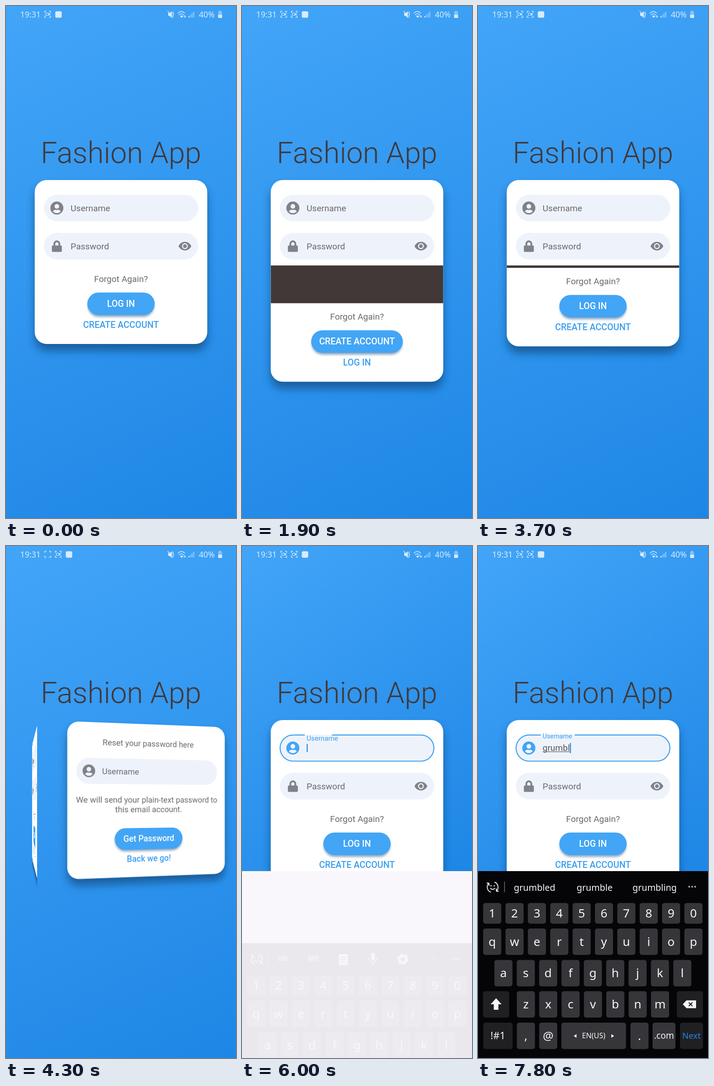
An HTML page that plays this animation: 502x1115 px, repeating every 8 s.

```html
<!DOCTYPE html>
<html lang="en">
<head>
<meta charset="utf-8">
<title>Login form</title>
<style>
  html, body { margin: 0; width: 100%; height: 100%; overflow: hidden; background: #f9f7fb; }
  #app { position: absolute; left: 0; top: 0; width: 502px; height: 1115px; overflow: hidden;
    perspective: 1000px; perspective-origin: 251px 557px; }
  .layer { position: absolute; left: 0; top: 0; width: 502px; height: 1115px; }
  .page { backface-visibility: hidden; }
  svg { display: block; width: 502px; height: 1115px; }
  text { font-family: Roboto, sans-serif; font-size: 19px; fill: #69696e; }
  .mid { text-anchor: middle; }
  .title { font-size: 64.3px; font-weight: 300; fill: #423838; }
  .strong { font-size: 19.5px; font-weight: 500; }
  .white { fill: #fff; }
  .blue { fill: #3b9ff0; }
  .sys text { font-family: "Noto Sans", sans-serif; }
</style>
</head>
<body>
<div id="app">
  <div class="layer"><svg id="back"></svg></div>
  <div class="layer page" id="login"></div>
  <div class="layer page" id="reset"></div>
</div>
<div class="layer"><svg id="system" class="sys"></svg></div>
<script>
const LOOP = 8000, STEP = 100;
const WIDTH = 502, FULL_HEIGHT = 1115, KEYBOARD_TOP = 708;
const EXPAND = 83, BLUE = '#42a5f5', GREY = '#808288';
const WORD = 'grumbl';
const TAPS = [6580, 6780, 6980, 7280, 7480, 7680];
const HINTS = [
  ['good', 'get', 'great'], ['great', 'group', 'grow'], ['grunt', 'gruel', 'grub'],
  ['grump', 'grumpy', 'grumble'], ['grumble', 'grumbled', 'grumbles'],
  ['grumbled', 'grumble', 'grumbling']
];

const $ = id => document.getElementById(id);
const attr = (id, values) => {
  for (const key in values) $(id).setAttribute(key, values[key]);
};
const show = (id, on) => attr(id, { visibility: on ? 'visible' : 'hidden' });
const clamp = x => Math.min(1, Math.max(0, x));
const part = (t, start, length) => clamp((t - start) / length);
const mix = (a, b, p) => a + (b - a) * p;

function cubic(x1, y1, x2, y2) {
  const at = (a, b, s) => 3 * a * s * (1 - s) ** 2 + 3 * b * s * s * (1 - s) + s ** 3;
  return x => {
    let low = 0, high = 1;
    for (let i = 0; i < 30; i++) {
      const s = (low + high) / 2;
      if (at(x1, x2, s) < x) low = s; else high = s;
    }
    return at(y1, y2, low);
  };
}
const ease = cubic(.25, .1, .25, 1);
const fastOutSlowIn = cubic(.4, 0, .2, 1);
const easeOutBack = x => 1 + 2.7 * (x - 1) ** 3 + 1.7 * (x - 1) ** 2;
function bounceOut(x) {
  const k = 7.5625, d = 2.75;
  if (x < 1 / d) return k * x * x;
  if (x < 2 / d) return k * (x - 1.5 / d) ** 2 + .75;
  if (x < 2.5 / d) return k * (x - 2.25 / d) ** 2 + .9375;
  return k * (x - 2.625 / d) ** 2 + .984375;
}

const text = (x, y, label, cls = '', more = '') =>
  `<text x="${x}" y="${y}" class="${cls}" ${more}>${label}</text>`;
const rect = (x, y, w, h, r, fill, more = '') =>
  `<rect x="${x}" y="${y}" width="${w}" height="${h}" rx="${r}" fill="${fill}" ${more}/>`;
const stroke = (d, color, width, more = '') =>
  `<path d="${d}" fill="none" stroke="${color}" stroke-width="${width}" ${more}/>`;

const person = (y, more = '') => `<path ${more} fill="${GREY}" fill-rule="evenodd"
  transform="translate(111 ${y}) scale(.0575)" d="M0-248a248 248 0 1 0 0 496a248 248 0 1 0 0-496z
  m0 96a88 88 0 1 1 0 176a88 88 0 1 1 0-176z M0 192c-59 0-111-27-147-68c19-35 56-60 99-60q24 8 48 8t48-8
  c43 0 80 25 99 60c-36 41-88 68-147 68z"/>`;
const lock = y => `<g transform="translate(111 ${y}) scale(.0488)">
  ${rect(-224, -32, 448, 288, 48, GREY)}${stroke('M-112-20v-84a112 112 0 0 1 224 0v84', GREY, 80)}</g>`;
const eye = y => `<g transform="translate(390.5 ${y})">
  <path d="M-14 0C-8-12.6 8-12.6 14 0C8 12.6-8 12.6-14 0z" fill="${GREY}"/>
  <circle r="5.2" fill="${GREY}" stroke="#eef3fb" stroke-width="2.4"/></g>`;
const field = y => rect(82.5, y - 29, 337, 58, 29, '#eef3fb');
const secretField = (y, label) => field(y) + lock(y) + text(141, y + 6.7, label) + eye(y);

const card = (id, bottom) =>
  rect(63, 392, 376, bottom - 377, 26, '#0b3c6b', `id="${id}Shade" opacity=".6" filter="url(#${id}Soft)"`) +
  rect(62.7, 379, 376.6, bottom - 379, 26, '#fff', `id="${id}Card"`);
const button = (id, y, w) =>
  rect(251 - w / 2 + 1, y + 5, w - 2, 48, 24, '#1a4e80', `id="${id}Under" opacity=".5" filter="url(#${id}Thin)"`) +
  rect(251 - w / 2, y, w, 49, 24.5, BLUE, `id="${id}Button"`);
const blurs = id => `<defs>
  <filter id="${id}Soft" x="-20%" y="-20%" width="140%" height="140%"><feGaussianBlur stdDeviation="9"/></filter>
  <filter id="${id}Thin" x="-20%" y="-30%" width="140%" height="170%"><feGaussianBlur stdDeviation="2.5"/></filter></defs>`;
const turning = (id, y, cls) => `<g transform="translate(251 ${y})">
  ${text(0, 6.8, 'LOG IN', 'mid strong ' + cls, `id="${id}Login"`)}
  ${text(0, 6.8, 'CREATE ACCOUNT', 'mid strong ' + cls, `id="${id}Create"`)}</g>`;

$('back').innerHTML = `<defs><linearGradient id="sky" gradientUnits="userSpaceOnUse" x1="0" y1="0" x2="${WIDTH}" y2="${FULL_HEIGHT}">
  <stop offset="0" stop-color="#42a5f8"/><stop offset="1" stop-color="#1e86e5"/></linearGradient></defs>
  ${rect(0, 0, WIDTH, FULL_HEIGHT, 0, 'url(#sky)')}
  ${text(251, 342, 'Fashion App', 'mid title')}`;

$('login').innerHTML = `<svg>${blurs('login')}
  <defs><clipPath id="slot"><rect id="slotRect" x="63" y="565" width="376"/></clipPath></defs>
  ${card('login', 736)}
  ${field(440)}${person(440, 'id="person"')}
  ${stroke('', '#3d9fee', 2.2, 'id="outline"')}
  ${text(0, 0, 'Username', '', 'id="label"')}
  ${text(141, 445.5, '', '', 'id="typed" style="fill:#58595e"')}
  ${rect(0, 0, 0, 1.2, 0, '#58595e', 'id="underline"')}
  ${rect(141, 431, 2.4, 18, 0, '#318fe6', 'id="caret"')}
  ${secretField(523, 'Password')}
  <g clip-path="url(#slot)">${rect(63, 565, 376, 84, 0, '#423838')}
    <g id="confirm">${rect(63, 565, 376, 84, 0, '#fff')}${secretField(606, 'Confirm')}</g></g>
  <g id="lower">${text(251, 600.5, 'Forgot Again?', 'mid')}
    ${button('login', 624, 147)}${turning('main', 648, 'white')}${turning('link', 694, 'blue')}</g></svg>`;

$('reset').innerHTML = `<svg>${blurs('reset')}
  ${card('reset', 728.5)}
  ${text(251, 430.5, 'Reset your password here', 'mid')}
  ${field(488)}${person(488)}${text(141, 494.7, 'Username')}
  ${text(251, 559, 'We will send your plain-text password to', 'mid')}
  ${text(251, 581, 'this email account.', 'mid')}
  ${button('reset', 617, 162)}
  ${text(251, 648, 'Get Password', 'mid strong white')}
  ${text(251, 694, 'Back we go!', 'mid strong blue')}</svg>`;

// Status bar
const PALE = '#d9ebfd';
const brackets = stroke('M-6.5-3v-3.5h3.5M3-6.5h3.5v3.5M6.5 3v3.5h-3.5M-3 6.5h-3.5v-3.5', PALE, 1.3);
const camera = stroke('M-4-2.5h5.5v5h-5.5zM2 0l2.5-1.8v3.6z', PALE, 1.2);
const statusText = (x, label) => text(x, 25, label, '', `style="font-size:17.5px;fill:${PALE}"`);
const statusBar = statusText(31, '19:31') + statusText(421, '40%') +
  `<g id="newIcon" transform="translate(91 18)">${brackets}<g id="camera">${camera}</g></g>
  <g id="icons"><g transform="translate(91 18)">${brackets}${camera}</g>${rect(107.5, 11.5, 14, 14, 3, PALE)}</g>
  <g fill="${PALE}"><path d="M354 15.5h3l5-4v14l-5-4h-3z"/>
    <rect x="463" y="12" width="8.5" height="14" rx="1.5" opacity=".45"/><rect x="465" y="10.5" width="4.5" height="2" opacity=".45"/>
    <rect x="463" y="19" width="8.5" height="7" rx="1"/>
    <path d="M380 22l3.5 4l3-4q-3-2.5-6.5 0z"/></g>
  ${stroke('M353 11l10 15M365.5 12l-1.5 3l2 3l-2 3l1.5 3.5M375 16q7.5-8 15.5 0M377.5 19.5q5-5 10.5 0M389 20v5M391.5 21v4', PALE, 1.5)}` +
  [0, 1, 2, 3].map(i => rect(398 + i * 3.6, 22 - i * 3.2, 2.1, 3 + i * 3.2, 0, PALE, `opacity="${i < 1 ? 1 : .55}"`)).join('');

// Keyboard
const KEY = '#363539', DARK_KEY = '#201f22', PITCH = 48.8;
const keyText = (x, y, label, size, fill = '#f6f6f6') =>
  text(x, y + size * .35, label, 'mid', `style="font-size:${size}px;fill:${fill}"`);
const key = (label, x, y, w, h, size = 26, fill = KEY, ink) =>
  rect(x - w / 2, y, w, h, 5, fill, /^[a-z]$/.test(label) ? `id="key-${label}"` : '') +
  keyText(x, y + h / 2, label, size, ink);
const row = (labels, x, y, h) =>
  [...labels].map((label, i) => key(label, x + i * PITCH, y, 39.5, h)).join('');
const dots = [461, 467.5, 474].map(x => `<circle cx="${x}" cy="742" r="2.1" fill="#a5a5a8"/>`).join('');
const toolbar = `<g id="tools">
  ${rect(77, 736, 22, 11, 2, '#6d6d70')}${rect(144, 734, 24, 13, 2, '#6d6d70')}
  ${rect(211, 732, 20, 24, 2, '#d8d8da')}${stroke('M215 739h12M215 744h12M215 749h8', '#202022', 2)}
  ${rect(281.5, 729, 9, 16, 4.5, '#d8d8da')}${stroke('M277 740a9 9 0 0 0 18 0M286 749v6', '#d8d8da', 2)}
  <circle cx="351" cy="743" r="7.5" fill="none" stroke="#d8d8da" stroke-width="6"/>
  <circle cx="351" cy="743" r="10.5" fill="none" stroke="#d8d8da" stroke-width="4" stroke-dasharray="5.5 5.5"/>
  ${stroke('M416 735v14M421 735v14', '#59595c', 1.5)}</g>`;
const smiley = stroke('M24 734a12 12 0 0 0 4 20M24 734v6M24 734h-5M40 752a12 12 0 0 0-4-20M40 752v-6M40 752h5M27 745q5 6 10 0', '#e4e4e6', 2) +
  '<circle cx="28.5" cy="740" r="1.5" fill="#e4e4e6"/><circle cx="35.5" cy="740" r="1.5" fill="#e4e4e6"/>';
const keyboard = `<g id="keyboard">${rect(0, KEYBOARD_TOP, WIDTH, 408, 0, '#050407')}
  ${smiley}${rect(57, 731, 1.6, 23, 0, '#68686b')}${toolbar}${dots}
  <g id="hints">${[123.5, 254.5, 385.5].map(x => keyText(x, 744, '', 19.5)).join('')}</g>
  ${row('1234567890', 31, 777.5, 45)}${row('qwertyuiop', 31, 833, 57.5)}
  ${row('asdfghjkl', 55.5, 901.5, 57.5)}${row('zxcvbnm', 104.5, 969.5, 57.5)}
  ${key('', 39.5, 969.5, 57, 57.5, 20, DARK_KEY)}${key('', 462.5, 969.5, 57, 57.5, 20, DARK_KEY)}
  <path d="M39.5 985l12 13h-7v12h-10v-12h-7z" fill="#f6f6f6"/>
  <path d="M447 998l8-8.5h21v17h-21z" fill="#f6f6f6"/>${stroke('M460 994l8 8M468 994l-8 8', DARK_KEY, 2.2)}
  ${key('!#1', 43.5, 1038, 64, 57.5, 22, DARK_KEY)}${row(',@', 104.5, 1038, 57.5)}
  ${key('EN(US)', 252.5, 1038, 141, 57.5, 16)}
  <path d="M215 1063v8l-6-4zM291 1063v8l6-4z" fill="#f6f6f6"/>
  ${row('.', 352.5, 1038, 57.5)}${key('.com', 406, 1038, 50, 57.5, 19)}
  ${key('Next', 466, 1038, 50, 57.5, 18.5, DARK_KEY, '#1e88e5')}</g>`;
$('system').innerHTML = keyboard + statusBar;

// Texts sit on the faces of a turning prism.
function turn(id, from, to, amount, direction) {
  const face = (name, angle) => attr(id + name, {
    transform: `translate(0 ${direction * 11 * Math.sin(angle)}) scale(1 ${Math.max(0, Math.cos(angle))})`
  });
  face(from, amount * Math.PI / 2);
  face(to, (amount - 1) * Math.PI / 2);
}

// Pages are neighbouring faces of a cube; position 0 faces the viewer.
function placePage(id, position) {
  const style = $(id).style;
  style.visibility = Math.abs(position) < .999 ? 'visible' : 'hidden';
  style.transformOrigin = position > 0 ? '0 50%' : '100% 50%';
  style.transform = position ? `translateX(${position * WIDTH}px) rotateY(${position * 90}deg)` : 'none';
}

function drawForm(t) {
  const back = t >= 2900;
  const mode = back ? 1 - part(t, 2950, 800) : part(t, 1360, 800);
  const extra = EXPAND * bounceOut(clamp(mode / .6875));
  const slide = fastOutSlowIn(clamp((mode - .6875) / .3125));
  attr('loginCard', { height: 357 + extra });
  attr('loginShade', { height: 359 + extra });
  attr('slotRect', { height: extra });
  attr('confirm', { transform: `translate(${-376 * (1 - slide)} 0)` });
  attr('lower', { transform: `translate(0 ${extra})` });

  const spin = part(t, back ? 2950 : 1360, 600);
  const [from, to] = back ? ['Create', 'Login'] : ['Login', 'Create'];
  turn('main', from, to, easeOutBack(spin), -1);
  turn('link', to, from, easeOutBack(spin), 1);
  const grow = fastOutSlowIn(clamp(spin * 1.5));
  const width = mix(147, 200, back ? 1 - grow : grow);
  attr('loginButton', { x: 251 - width / 2, width });
  attr('loginUnder', { x: 252 - width / 2, width: width - 2 });
}

function drawFocus(t) {
  const float = fastOutSlowIn(part(t, 5895, 200)), focused = float > .01;
  attr('person', { fill: focused ? BLUE : GREY });
  attr('label', { transform: `translate(141 ${mix(446.7, 418.5, float)}) scale(${1 - .25 * float})` });
  $('label').style.fill = focused ? '#3b9ff0' : '';
  attr('outline', { d: `M${137 + 74 * float} 411.7H390.5a28.4 28.4 0 0 1 0 56.8H111.5a28.4 28.4 0 0 1 0-56.8H137` });
  show('outline', focused);
  show('caret', focused);

  const count = TAPS.filter(tap => t >= tap).length;
  $('typed').textContent = WORD.slice(0, count);
  const length = count ? $('typed').getComputedTextLength() : 0;
  attr('underline', { x: 141, y: 447.5, width: length });
  attr('caret', { x: 141 + length, y: count ? 429 : 431, height: count ? 22 : 18 });
  show('tools', !count);
  [...$('hints').children].forEach((hint, i) => hint.textContent = count ? HINTS[count - 1][i] : '');
  [...WORD].forEach((letter, i) =>
    attr('key-' + letter, { fill: t >= TAPS[i] && t < TAPS[i] + 110 ? '#6a696e' : KEY }));
}

function drawKeyboard(t) {
  const open = part(t, 5950, 300), height = open ? KEYBOARD_TOP : FULL_HEIGHT;
  $('app').style.height = height + 'px';
  attr('sky', { y2: height });
  attr('keyboard', { transform: `translate(0 ${226 * (1 - open) ** 2})`, opacity: open ** 1.6 });
}

function drawStatus(t) {
  const arrive = part(t, 50, 200);
  attr('newIcon', { opacity: arrive });
  attr('icons', { transform: `translate(${23 * arrive} 0)` });
  show('camera', (t + 400) % 1000 < 500);
}

function draw(t) {
  drawStatus(t);
  drawForm(t);
  const page = t < 4900 ? ease(part(t, 3990, 550)) : 1 - ease(part(t, 5082, 500));
  placePage('login', -page);
  placePage('reset', 1 - page);
  drawKeyboard(t);
  drawFocus(t);
}

const start = performance.now();
function tick() {
  const elapsed = (performance.now() - start) % LOOP;
  draw(Math.floor(elapsed / STEP) * STEP);
  requestAnimationFrame(tick);
}
tick();
</script>
</body>
</html>
```
